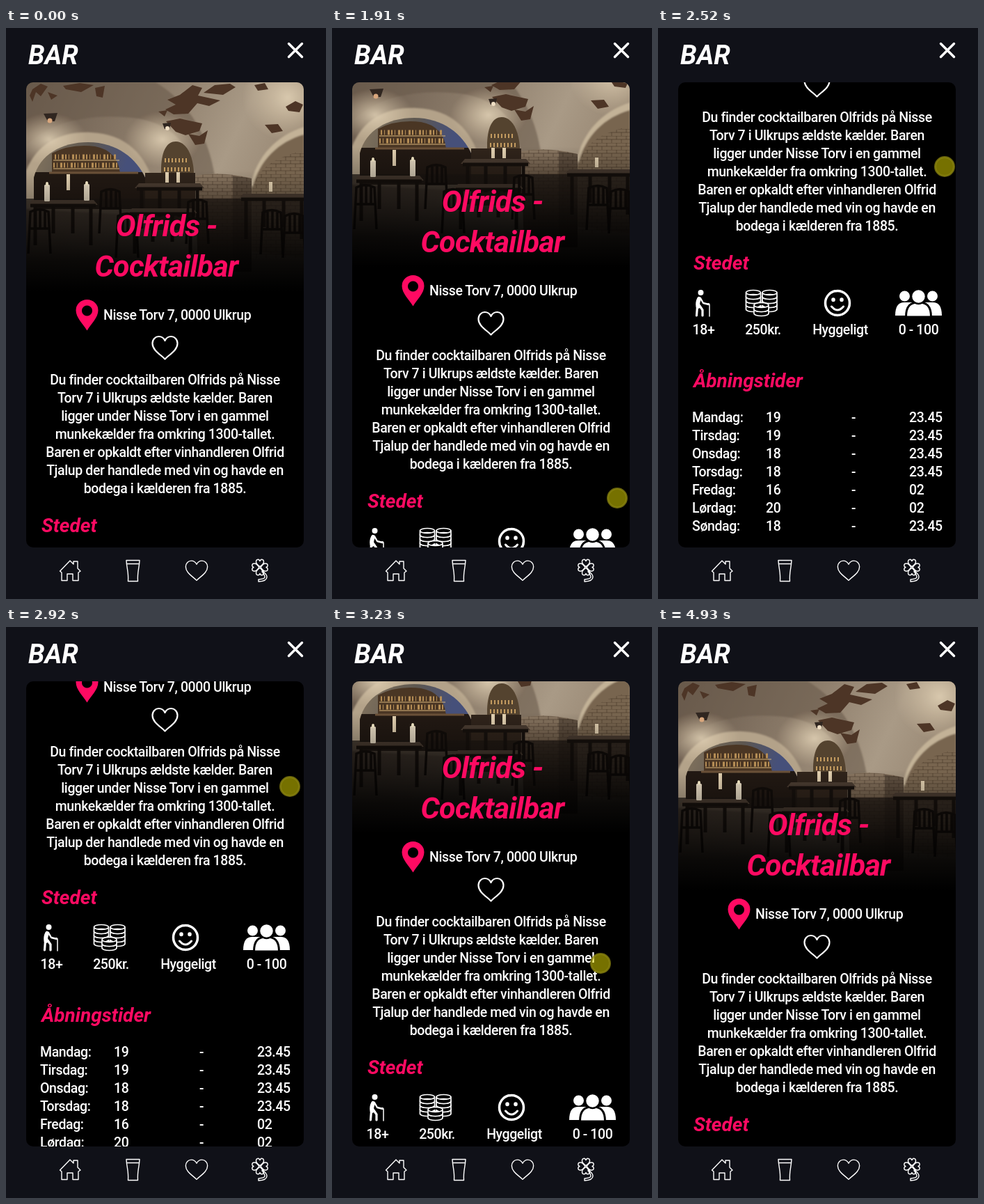
Write an HTML page that moves like this. It is 460x820 px and loops after 5.48 s.

```html
<!DOCTYPE html>
<html lang="da">
<head>
<meta charset="utf-8">
<title>Bar</title>
<style>
  html, body { margin: 0; width: 100%; height: 100%; overflow: hidden; background: #101118; }
  svg { display: block; width: 100%; height: 100%; }
  text { font: 500 19.5px Roboto, "Open Sans", sans-serif; letter-spacing: -.4px; fill: #fff; }
  .mid { text-anchor: middle; }
  .head { font-size: 38px; font-weight: 700; font-style: italic; letter-spacing: 0; }
  .title { font-size: 43px; font-weight: 700; font-style: italic; letter-spacing: -.8px; fill: #ff0a62; }
  .sub { font-size: 28px; font-weight: 700; font-style: italic; letter-spacing: 0; fill: #ff0a62; }
  .line { fill: none; stroke: #fff; stroke-linecap: round; stroke-linejoin: round; }
</style>
</head>
<body>
<svg viewBox="0 0 460 820">
  <defs>
    <clipPath id="card"><rect x="29" y="78" width="399" height="668" rx="10"/></clipPath>
    <clipPath id="photo"><rect x="29" y="78" width="399" height="300"/></clipPath>
    <clipPath id="arch"><path d="M40 260V215C48 182 80 164 118 164C160 164 188 188 200 215V260Z"/></clipPath>
    <linearGradient id="vault" x1="0" y1="0" x2="1" y2=".35">
      <stop offset="0" stop-color="#66574a"/><stop offset=".45" stop-color="#8c7c6a"/>
      <stop offset=".75" stop-color="#a99a86"/><stop offset="1" stop-color="#958470"/>
    </linearGradient>
    <radialGradient id="glow">
      <stop offset="0" stop-color="#e2d2b6" stop-opacity=".85"/><stop offset="1" stop-color="#d8c6a8" stop-opacity="0"/>
    </radialGradient>
    <linearGradient id="room" x1="0" y1="0" x2="1" y2=".2">
      <stop offset="0" stop-color="#86765f"/><stop offset=".5" stop-color="#5d5750"/><stop offset=".85" stop-color="#46507a"/>
    </linearGradient>
    <linearGradient id="brick" x1="0" y1="0" x2="0" y2="1">
      <stop offset="0" stop-color="#8b7863"/><stop offset=".4" stop-color="#665340"/><stop offset="1" stop-color="#2c221a"/>
    </linearGradient>
    <linearGradient id="fade" x1="0" y1="0" x2="0" y2="1">
      <stop offset="0" stop-opacity="0"/><stop offset=".45" stop-opacity=".45"/>
      <stop offset=".75" stop-opacity=".82"/><stop offset="1"/>
    </linearGradient>
    <pattern id="bricks" width="14" height="10" patternUnits="userSpaceOnUse">
      <path d="M0 0H14M0 5H14M3 0V5M10 5V10" stroke="#2a1d13" stroke-opacity=".4" fill="none"/>
    </pattern>
    <filter id="soft"><feGaussianBlur stdDeviation="1.2"/></filter>
    <path id="heart" d="M0 16.5C-6 10-18 4-18-6C-18-12-13.5-16-9-16C-5-16-1.5-13.5 0-10C1.5-13.5 5-16 9-16C13.5-16 18-12 18-6C18 4 6 10 0 16.5Z"/>
    <path id="leaf" d="M0-1C-3-3-6-5.500-5.500-8.500C-5-12-1-12 0-9C1-12 5-12 5.500-8.500C6-5.500 3-3 0-1Z"/>
    <path id="coin" d="M-10.500 0a10.500 3.500 0 0 1 21 0v6a10.500 3.500 0 0 1-21 0zM-10.500 0a10.500 3.500 0 0 0 21 0"/>
    <g id="candle"><rect x="-4" y="-12" width="8" height="24" rx="1.500" fill="#e9dcc4"/><ellipse cy="-13" rx="2" ry="3" fill="#fff3cf"/></g>
    <g id="table">
      <path d="M-44-3H44L50 4H-50Z" fill="#4a3c31"/>
      <path d="M-47 5H47M-40 5V62M40 5V62M-14 5V45M14 5V45" stroke="#17110d" stroke-width="5"/>
    </g>
    <path id="chair" d="M-16 60L-13 0Q0-7 13 0L16 60M-13 24H14M-6-2V24M1-3V24M8-2V24" fill="none" stroke="#120d0a" stroke-width="3.500"/>
  </defs>

  <rect width="460" height="820" fill="#101118"/>
  <text class="head" x="32" y="52">BAR</text>
  <path class="line" stroke-width="3.500" d="M406.500 22.500L425.500 41.500M425.500 22.500L406.500 41.500"/>

  <g clip-path="url(#card)">
    <rect x="29" y="78" width="399" height="668"/>
    <g id="content">
      <g clip-path="url(#photo)">
        <rect x="29" y="78" width="399" height="300" fill="url(#vault)"/>
        <g filter="url(#soft)">
          <path d="M29 78H215C260 105 290 150 300 212L272 215C262 160 236 140 190 130C130 122 70 130 29 170Z" fill="#6b5b4c" opacity=".6"/>
          <path d="M29 260V205C45 165 80 148 122 150C172 152 202 182 212 225V270Z" fill="#b3a289"/>
          <ellipse cx="62" cy="160" rx="55" ry="38" fill="url(#glow)"/>
          <ellipse cx="225" cy="160" rx="55" ry="40" fill="url(#glow)"/>
          <ellipse cx="405" cy="100" rx="65" ry="62" fill="url(#glow)"/>
          <path d="M352 320V235C362 190 390 163 428 152V330Z" fill="#78654f"/>
          <path d="M352 225C360 185 388 155 428 142V153C392 163 364 190 355 228Z" fill="#c3b297"/>
        </g>
        <g clip-path="url(#arch)">
          <rect x="38" y="160" width="165" height="100" fill="url(#room)"/>
          <path d="M66 208V180Q92 166 128 170Q160 176 164 208Z" fill="#4a3624"/>
          <path d="M70 185H160M68 197H162" stroke="#b58d55" stroke-width="7" stroke-dasharray="2 3 1 4 3 2"/>
          <path d="M68 190H163M68 202H163" stroke="#d7b47a" stroke-width="1"/>
          <rect x="38" y="207" width="165" height="60" fill="#221913"/>
          <path d="M62 208H190" stroke="#6b5138" stroke-width="3"/>
        </g>
        <path d="M223 240V200C224 175 232 163 244 163C258 163 268 180 270 205V245Z" fill="#54432f"/>
        <path d="M228 190H262M227 203H265" stroke="#c39b60" stroke-width="6" stroke-dasharray="2 3"/>
        <path d="M200 208H272V290H200Z" fill="#30241b"/>
        <path d="M272 212Q310 205 353 216V350H276Z" fill="url(#brick)"/>
        <path d="M272 212Q310 205 353 216V350H276Z" fill="url(#bricks)"/>
        <path d="M354 230C364 198 390 185 428 176V330H354Z" fill="url(#bricks)"/>
        <path d="M326 212L353 216V350H326Z" fill="#1c130d" opacity=".35"/>
        <path fill="#4d3526" d="M232 103L250 96 268 82 282 86 276 97 308 104 292 112 275 108 262 123 241 124 229 117 244 110ZM284 93L300 82 322 80 330 85 312 96ZM38 88L50 80 60 84 50 98 43 92 38 106 34 97ZM60 92L74 97 65 103ZM82 83L106 79 126 82 108 92 86 88ZM128 86L142 83 139 100 130 98ZM219 120L232 118 228 127ZM230 134L250 130 282 137 278 148 258 154 244 149ZM262 152L278 155 290 147 285 166 272 168ZM402 113L416 105 427 110 422 121 406 119ZM357 82L372 79 377 88 362 90ZM372 139L391 138 398 148 382 151Z"/>
        <path d="M54 123L74 122 70 134H60ZM225 137L237 136 235 145H228Z" fill="#302620"/>
        <circle cx="63" cy="133" r="3.500" fill="#d9a77d"/><circle cx="232" cy="144" r="3" fill="#f0dfc4"/>
        <rect x="29" y="245" width="399" height="133" fill="#1e1712" opacity=".72"/>
        <use href="#table" x="82" y="250"/><use href="#table" x="235" y="226"/>
        <use href="#table" x="385" y="241"/><use href="#table" x="225" y="262"/>
        <use href="#chair" x="48" y="264"/><use href="#chair" x="150" y="235"/><use href="#chair" x="174" y="270"/>
        <use href="#chair" x="275" y="250"/><use href="#chair" x="382" y="265"/><use href="#chair" x="414" y="270"/>
        <use href="#candle" x="59" y="237"/><use href="#candle" x="116" y="236"/>
        <g fill="#e3d1b1"><rect x="87" y="210" width="5" height="23"/><rect x="229" y="207" width="5" height="15"/><rect x="245" y="207" width="5" height="15"/><rect x="378" y="221" width="5" height="14"/></g>
        <rect x="29" y="205" width="399" height="173" fill="url(#fade)"/>
      </g>

      <text class="title mid" x="230.500" y="299">Olfrids -</text>
      <text class="title mid" x="230.500" y="357">Cocktailbar</text>
      <path fill="#ff0a62" fill-rule="evenodd" d="M116.500 434.500C111 425 100.500 416 100.500 405.500A16 15.500 0 0 1 132.500 405.500C132.500 416 122 425 116.500 434.500ZM116.500 398.500a7.500 7.500 0 1 0 .01 0Z"/>
      <text x="140" y="419">Nisse Torv 7, 0000 Ulkrup</text>
      <use href="#heart" class="line" stroke-width="2.200" transform="translate(228.500 459)"/>
      <g id="about"></g>

      <text class="sub" x="51" y="724">Stedet</text>
      <g class="line">
        <circle cx="61.500" cy="757" r="4" fill="#fff" stroke="none"/>
        <path stroke-width="6" d="M59 766Q56.500 771 57.500 777"/>
        <path stroke-width="3.200" d="M56.500 777L55.500 790M60 776L64 782V790"/>
        <path stroke-width="2.400" d="M61 765L65 772 73 774"/>
        <path stroke-width="1.500" d="M71.500 773Q74 772 74 775V791"/>
      </g>
      <g id="coins" class="line" style="fill:#000" stroke-width="1.700"></g>
      <g class="line">
        <circle cx="258" cy="772" r="17.500" stroke-width="3.500"/>
        <path stroke-width="3" d="M249.500 777Q258 787 266.500 777"/>
        <path stroke-width="5.500" d="M252 767V767.500M264 767V767.500"/>
      </g>
      <g fill="#fff">
        <circle cx="354.500" cy="762" r="7.500"/><circle cx="394.500" cy="762" r="7.500"/>
        <path d="M341 790C341 776 346 771 354 771H395C403 771 408 776 408 790Z"/>
        <path d="M356.500 792C356.500 776 363 771 374.500 771S392.500 776 392.500 792Z" stroke="#000" stroke-width="3"/>
        <circle cx="374.500" cy="762.500" r="10.500" stroke="#000" stroke-width="2.500"/>
        <path d="M338 791H410V796H338Z" fill="#000"/>
      </g>
      <g class="mid">
        <text x="65.500" y="817">18+</text><text x="151" y="817">250kr.</text>
        <text x="262" y="817">Hyggeligt</text><text x="374.500" y="817">0 - 100</text>
      </g>
      <text class="sub" x="51" y="893">Åbningstider</text>
      <g id="hours"></g>
    </g>
  </g>

  <g class="line" stroke-width="1.400">
    <path d="M77.500 780L92 765 97 770V766H103V776L107 780 104 782V793.500H96V784H88V793.500H80V782Z"/>
    <path d="M173 764.500H192C191.500 776 188.500 782 189.500 794.500H175.500C176.500 782 173.500 776 173 764.500ZM174 769.500H191"/>
    <use href="#heart" transform="translate(274 779) scale(.87)" stroke-width="1.600"/>
    <g transform="translate(365 774.500)">
      <use href="#leaf"/><use href="#leaf" transform="rotate(90)"/><use href="#leaf" transform="rotate(180)"/><use href="#leaf" transform="rotate(270)"/>
      <path d="M1 1C4 8 10 8 10 14C10 18 6 20-2 20.500M3 6C6 10 7 11 7 14C7 16 3 17-2 17.500V20.500"/>
    </g>
  </g>
  <circle id="pointer"/>
</svg>
<script>
const LOOP = 5480, TICK = 77.5, START = 190, MAX_SCROLL = 377;
const PRESS = 19, TURN = 31, RELEASE = 58, GONE = 61;
const $ = id => document.getElementById(id);
const clamp = (v, lo, hi) => Math.min(hi, Math.max(lo, v));
const text = (x, y, s, cls = "") => `<text class="${cls}" x="${x}" y="${y}">${s}</text>`;

$("about").innerHTML = [
  "Du finder cocktailbaren Olfrids på Nisse",
  "Torv 7 i Ulkrups ældste kælder. Baren",
  "ligger under Nisse Torv i en gammel",
  "munkekælder fra omkring 1300-tallet.",
  "Baren er opkaldt efter vinhandleren Olfrid",
  "Tjalup der handlede med vin og havde en",
  "bodega i kælderen fra 1885."
].map((s, i) => text(228.5, 512 + 26 * i, s, "mid")).join("");

$("hours").innerHTML = [
  ["Mandag", 19, "23.45"], ["Tirsdag", 19, "23.45"], ["Onsdag", 18, "23.45"], ["Torsdag", 18, "23.45"],
  ["Fredag", 16, "02"], ["Lørdag", 20, "02"], ["Søndag", 18, "23.45"]
].map(([day, from, to], i) => {
  const y = 943 + 26 * i;
  return text(49, y, day + ":") + text(155, y, from) + text(278, y, "-") + text(361, y, to);
}).join("");

const stack = (x, top, n) => Array.from({ length: n },
  (_, i) => `<use href="#coin" x="${x}" y="${top + 6 * (n - 1 - i)}"/>`).join("");
$("coins").innerHTML = stack(137, 757, 4) + stack(160.5, 757, 4) + stack(148.5, 775, 2);

// Pointer path: tick, x, y
const path = [
  [0, 406, 799], [1, 409, 792], [3, 409, 792], [10, 412, 731], [18, 412, 731],
  [19, 411, 730], [20, 411, 730], [22, 410, 675], [25, 409, 485], [27, 408, 327],
  [28, 409, 268], [29, 411, 222], [31, 413, 176], [33, 413, 176], [34, 411, 194],
  [35, 408, 229], [39, 386, 483], [40, 386, 556], [41, 386, 612], [42, 386, 652],
  [44, 387, 694], [57, 387, 694], [58, 386, 704], [60, 390, 791]
];

function pointerAt(n) {
  const i = path.findIndex(p => p[0] >= n);
  if (i < 0) return path.at(-1).slice(1);
  if (i === 0) return path[0].slice(1);
  const [a, ax, ay] = path[i - 1], [b, bx, by] = path[i];
  const k = (n - a) / (b - a);
  return [ax + (bx - ax) * k, ay + (by - ay) * k];
}

function scrollAt(n, y) {
  if (n < PRESS || n >= RELEASE) return 0;
  return clamp(n <= TURN ? 710 - y : 326 - .9606 * (y - 229), 0, MAX_SCROLL);
}

function draw(now) {
  const n = Math.floor((now % LOOP - START) / TICK);
  const [x, y] = pointerAt(n);
  const pressed = n >= PRESS && n < RELEASE;
  const look = pressed
    ? { r: 13.5, fill: "rgba(250,240,0,.47)", stroke: "rgba(140,134,16,.75)", "stroke-width": 3 }
    : { r: 12.8, fill: "rgba(60,60,60,.08)", stroke: "rgba(75,75,75,.45)", "stroke-width": 2.4 };
  const attrs = { ...look, cx: x, cy: y, visibility: n >= 0 && n < GONE ? "visible" : "hidden" };
  for (const key in attrs) $("pointer").setAttribute(key, attrs[key]);
  $("content").setAttribute("transform", `translate(0 ${-Math.round(scrollAt(n, y))})`);
}

const begin = performance.now();
function frame() {
  draw(performance.now() - begin);
  requestAnimationFrame(frame);
}
frame();
</script>
</body>
</html>
```
